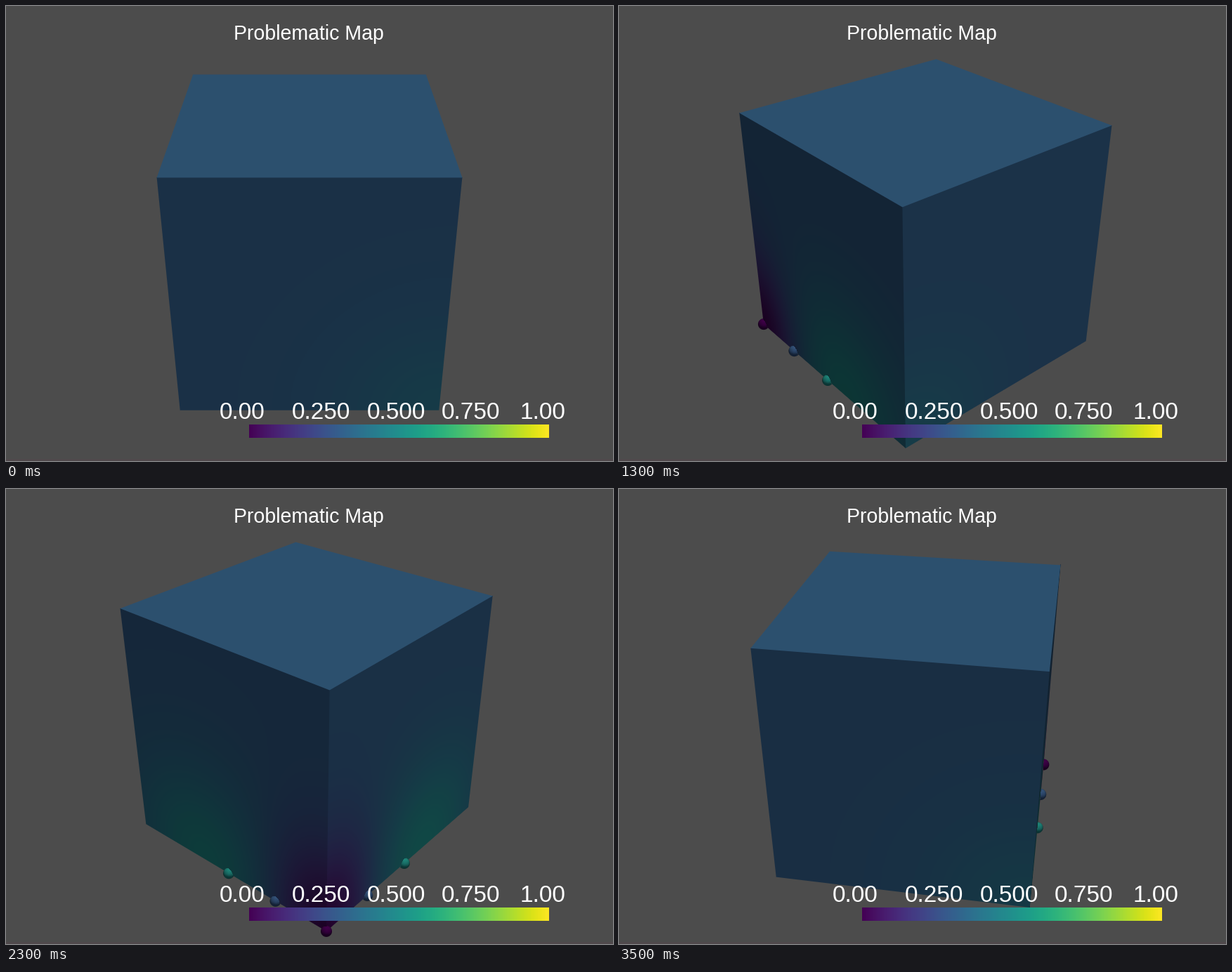
Recreate the animation shown at these times as a matplotlib script. Size 864x648 px, loop 3600 ms.

```python
import numpy as np
import matplotlib as mpl
import matplotlib.pyplot as plt
from matplotlib.animation import FuncAnimation

W, H, DPI = 864, 648, 100
FRAMES, STEP_MS = 36, 100
BG = np.array([76, 76, 76]) / 255
STRIP = np.array([80, 73, 76]) / 255

# Camera: 30 degree lens, raised 30 degrees, aimed at the centre of a unit cube
DIST = 2 * np.sqrt(3)
FOCAL = H / 2 / np.tan(np.radians(15))
RIGHT = np.array([1, 0, 0])
UP = np.array([0, np.cos(np.pi / 6), -0.5])
BACK = np.array([0, 0.5, np.cos(np.pi / 6)])
EYE = DIST * BACK
TOP = np.array([0, 1.0, 0])

PX, PY = np.meshgrid(np.arange(W) + 0.5, np.arange(H) + 0.5)
RAYS = (((PX - W / 2) / FOCAL)[..., None] * RIGHT
        + ((H / 2 - PY) / FOCAL)[..., None] * UP - BACK)

VIRIDIS = mpl.colormaps["viridis"](np.linspace(0, 1, 256))[:, :3]

BALL_PX = 8  # radius on screen, the same at any depth
BALLS = [(0, 0, 0.0), (0.25, 0, 0.28), (0.5, 0, 0.5),
         (0, 0.25, 0.28), (0, 0.5, 0.5)]


def light_from(elev, azim):
    e, a = np.radians([elev, azim])
    return np.cos(e) * np.sin(a) * RIGHT + np.sin(e) * UP + np.cos(e) * np.cos(a) * BACK


WARM, COOL, NEUTRAL = (1, 0.972, 0.902), (0.933, 0.966, 1), (1, 1, 0.986)
LIGHTS = [(light_from(50, 10), 0.75 * np.array(WARM)),
          (light_from(-75, 0), 0.25 * np.array(COOL)),
          (light_from(0, 0), 0.25 * np.array(NEUTRAL)),
          (light_from(0, 110), 0.214 * np.array(NEUTRAL)),
          (light_from(0, -110), 0.214 * np.array(NEUTRAL))]


def shade(normal):
    return sum(np.maximum(normal @ d, 0)[..., None] * c for d, c in LIGHTS)


def colour(value):
    return VIRIDIS[np.clip(np.asarray(value) * 255 + 0.5, 0, 255).astype(int)]


def project(p):
    rel = p - EYE
    scale = FOCAL / -(rel @ BACK)
    return np.stack([W / 2 + rel @ RIGHT * scale, H / 2 - rel @ UP * scale], -1)


def window(lo, hi):
    x0, y0 = np.maximum(np.floor(lo).astype(int) - 1, 0)
    x1, y1 = np.minimum(np.ceil(hi).astype(int) + 1, (W, H))
    return slice(y0, y1), slice(x0, x1)


def coverage(poly, box):
    """Soft mask of a convex polygon."""
    nxt = np.roll(poly, -1, axis=0)
    area = np.sum(poly[:, 0] * nxt[:, 1] - poly[:, 1] * nxt[:, 0])
    inside = np.inf
    for (x0, y0), (x1, y1) in zip(poly, nxt):
        cross = (x1 - x0) * (PY[box] - y0) - (y1 - y0) * (PX[box] - x0)
        inside = np.minimum(inside, np.sign(area) * cross / np.hypot(x1 - x0, y1 - y0))
    return np.clip(inside + 0.5, 0, 1)


def field(a, b, h):
    """Scalar on the cube: a low corner and a high spot on each of two edges."""
    def bump(da, db, sigma, sigma_h):
        return np.exp(-(da**2 + db**2) / (2 * sigma**2) - h**2 / (2 * sigma_h**2))
    high = bump(a - 0.62, b, 0.28, 0.3) + bump(a, b - 0.62, 0.28, 0.3)
    return 0.302 + 0.195 * high - 0.325 * bump(a, b, 0.2, 0.27)


def draw_cube(img, depth, ea, eb):
    total = np.zeros((H, W))
    paint = np.zeros((H, W, 3))
    for n, u, v in [(TOP, ea, eb), (ea, eb, TOP), (-ea, eb, TOP),
                    (eb, ea, TOP), (-eb, ea, TOP)]:
        if n @ EYE <= 0.5:
            continue
        poly = project(np.array([n - u - v, n + u - v, n + u + v, n - u + v]) / 2)
        box = window(poly.min(0), poly.max(0))
        mask = coverage(poly, box)
        rays = RAYS[box]
        slope = rays @ n
        t = (0.5 - n @ EYE) / np.where(slope < -1e-6, slope, -1e-6)
        hit = [0.5 + EYE @ e + t * (rays @ e) for e in (ea, eb, TOP)]
        val = field(*[np.clip(c, 0, 1) for c in hit])
        paint[box] += mask[..., None] * colour(val) * shade(n)
        total[box] += mask
        depth[box] = np.where(mask >= 0.5, np.minimum(depth[box], t), depth[box])
    paint /= np.maximum(total, 1)[..., None]
    img *= 1 - np.minimum(total, 1)[..., None]
    img += paint


def draw_ball(img, depth, centre, value):
    """Ball that always faces the camera."""
    x, y = mid = project(centre)
    box = window(mid - BALL_PX, mid + BALL_PX)
    dx, dy = (PX[box] - x) / BALL_PX, (y - PY[box]) / BALL_PX
    r = np.hypot(dx, dy)
    dz = np.sqrt(np.maximum(1 - r**2, 0))
    normal = np.stack([dx, dy, dz], -1) / np.maximum(r, 1)[..., None]
    normal = normal @ np.array([RIGHT, UP, BACK])
    far = (EYE - centre) @ BACK
    t = far - dz * BALL_PX * far / FOCAL
    mask = np.clip((1 - r) * BALL_PX + 0.5, 0, 1)
    mask = (mask * (t < depth[box]))[..., None]
    img[box] = img[box] * (1 - mask) + mask * colour(value) * shade(normal)
    depth[box] = np.where(mask[..., 0] >= 0.5, t, depth[box])


def render(i):
    th = np.radians(i * 360 / FRAMES)
    ea = np.array([np.sin(th), 0, np.cos(th)])
    eb = np.array([-np.cos(th), 0, np.sin(th)])
    img = np.ones((H, W, 3)) * BG
    img[H - 3:] = STRIP
    depth = np.full((H, W), np.inf)
    draw_cube(img, depth, ea, eb)
    for a, b, value in BALLS:
        draw_ball(img, depth, (a - 0.5) * ea + (b - 0.5) * eb - 0.5 * TOP, value)
    img[596:615, 346:773] = colour(np.linspace(0, 1, 427))
    return np.clip(img, 0, 1)


fig = plt.figure(figsize=(W / DPI, H / DPI), dpi=DPI, facecolor=BG)
ax = fig.add_axes([0, 0, 1, 1])
ax.set_axis_off()
view = ax.imshow(render(0), extent=(0, W, H, 0), interpolation="nearest", aspect="auto")


def label(x, y, text, px):
    ax.text(x, y, text, color="white", family="Liberation Sans",
            size=px * 72 / DPI, ha="center", va="baseline")


label(431, 47.5, "Problematic Map", 28.5)
for x, text in [(336.5, "0.00"), (448.5, "0.250"), (555, "0.500"),
                (661.5, "0.750"), (764, "1.00")]:
    label(x, 588, text, 33.5)


def update(i):
    view.set_data(render(i))
    return [view]


anim = FuncAnimation(fig, update, frames=FRAMES, interval=STEP_MS,
                     repeat=True, repeat_delay=0, blit=False)
plt.show()
```
